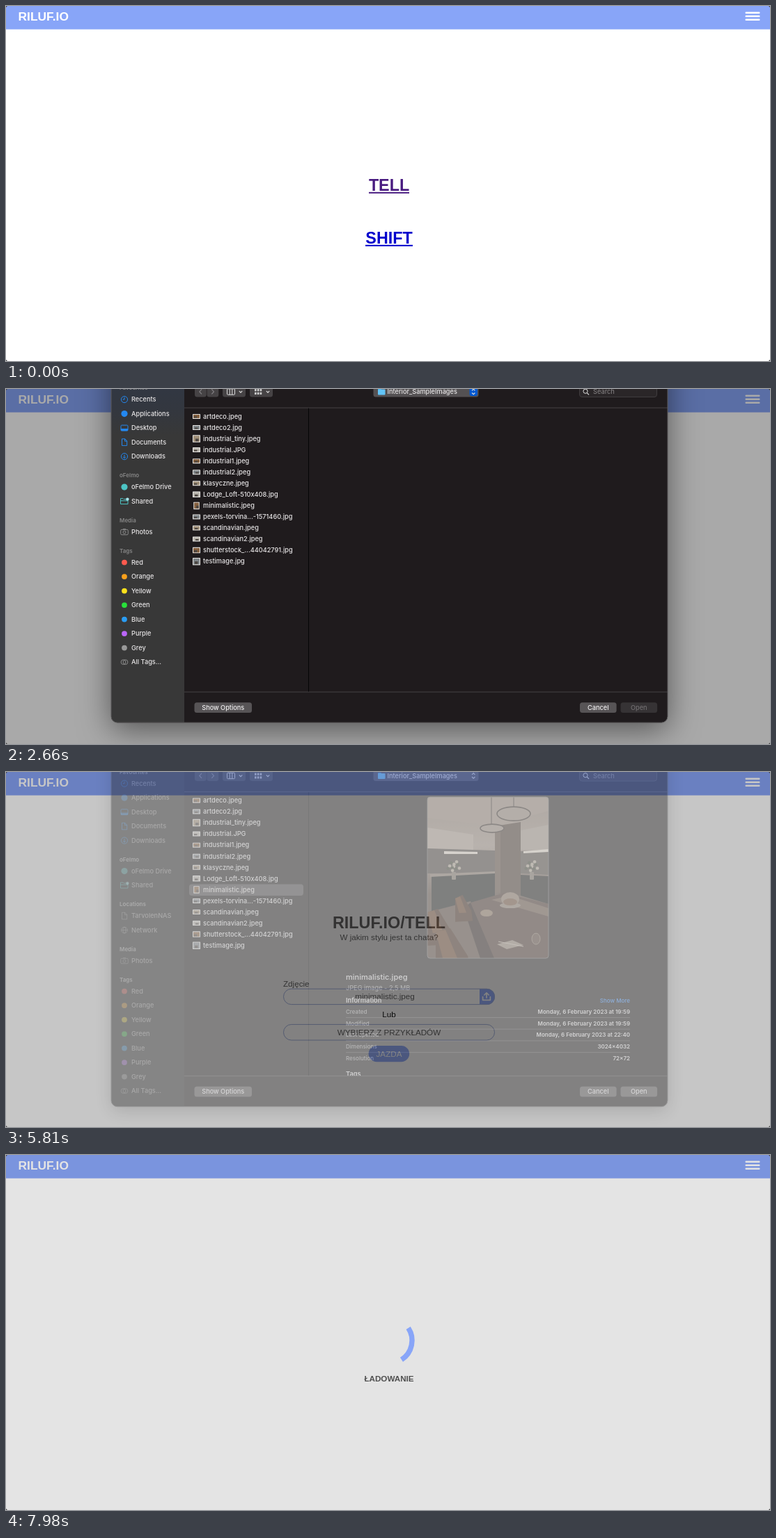
Recreate the animation shown at these times as an HTML page with a canvas. Size 1097 by 511 pixels, loop 8000 ms.

```html
<!DOCTYPE html>
<html lang="pl">
<head>
<meta charset="utf-8">
<title>Room style demo</title>
<style>
html, body { margin: 0; width: 100%; height: 100%; overflow: hidden; background: #fff; }
canvas { display: block; }
</style>
</head>
<body>
<canvas id="stage" width="1097" height="511"></canvas>
<script>
const W = 1097, H = 511, LOOP = 8000, STEP = 70;
const page = document.getElementById('stage').getContext('2d');
const sheetCanvas = document.createElement('canvas');
sheetCanvas.width = W;
sheetCanvas.height = H;
const sheet = sheetCanvas.getContext('2d');

const SANS = '"Liberation Sans", Arial, sans-serif';
const UI = 'Inter, Roboto, sans-serif';
const BRAND = 'RILUF.IO';
const BLUE = '#88a5f8', ACCENT = '#0058d0', ICON = '#2488f0', TEAL = '#4cc4c4', GREY = '#8b8b8b';

const FILES = ['artdeco.jpeg', 'artdeco2.jpg', 'industrial_tiny.jpeg', 'industrial.JPG',
  'industrial1.jpeg', 'industrial2.jpeg', 'klasyczne.jpeg', 'Lodge_Loft-510x408.jpg',
  'minimalistic.jpeg', 'pexels-torvina...-1571460.jpg', 'scandinavian.jpeg',
  'scandinavian2.jpeg', 'shutterstock_...44042791.jpg', 'testimage.jpg'];
const SELECTED = 8;

const SIDEBAR = [
  ['Favourites', [['Recents', 'clock', ICON], ['Applications', 'dot', ICON], ['Desktop', 'desktop', ICON],
    ['Documents', 'doc', ICON], ['Downloads', 'down', ICON]]],
  ['oFelmo', [['oFelmo Drive', 'dot', TEAL], ['Shared', 'folder', TEAL]]],
  ['Locations', [['TarvolenNAS', 'doc', GREY], ['Network', 'globe', GREY]]],
  ['Media', [['Photos', 'camera', GREY]]],
  ['Tags', [['Red', 'tag', '#ff5a4e'], ['Orange', 'tag', '#f9a01c'], ['Yellow', 'tag', '#ffe21c'],
    ['Green', 'tag', '#28e03a'], ['Blue', 'tag', '#2a9df4'], ['Purple', 'tag', '#bb66fa'],
    ['Grey', 'tag', '#999'], ['All Tags...', 'rings', GREY]]]
];

const INFO = [['Created', 'Monday, 6 February 2023 at 19:59'], ['Modified', 'Monday, 6 February 2023 at 19:59'],
  ['Last opened', 'Monday, 6 February 2023 at 22:40'], ['Dimensions', '3024×4032'], ['Resolution', '72×72']];

function text(c, str, x, y, size, color, { weight = 400, align = 'left', family = SANS } = {}) {
  c.font = `${weight} ${size}px ${family}`;
  c.textAlign = align;
  c.fillStyle = color;
  c.fillText(str, x, y);
}

// Interface text, placed by its vertical centre.
function label(str, x, cy, size = 9.2, color = '#e8e6e7', weight = 500, align = 'left') {
  text(sheet, str, x, cy + size * 0.36, size, color, { weight, align, family: UI });
}

function box(c, x, y, w, h, r, fill, stroke) {
  c.beginPath();
  c.roundRect(x, y, w, h, r);
  if (fill) { c.fillStyle = fill; c.fill(); }
  if (stroke) { c.strokeStyle = stroke; c.stroke(); }
}

function line(c, color, width, ...pts) {
  c.beginPath();
  for (let i = 0; i < pts.length; i += 2) c.lineTo(pts[i], pts[i + 1]);
  c.strokeStyle = color;
  c.lineWidth = width;
  c.stroke();
}

function poly(c, fill, ...pts) {
  c.beginPath();
  for (let i = 0; i < pts.length; i += 2) c.lineTo(pts[i], pts[i + 1]);
  c.fillStyle = fill;
  c.fill();
}

function oval(c, x, y, rx, ry, fill, stroke) {
  c.beginPath();
  c.ellipse(x, y, rx, ry, 0, 0, 7);
  if (fill) { c.fillStyle = fill; c.fill(); }
  if (stroke) { c.strokeStyle = stroke; c.stroke(); }
}

function drawNav() {
  page.fillStyle = BLUE;
  page.fillRect(0, 0, W, 33.6);
  text(page, BRAND, 17.5, 20.8, 17.4, '#fff', { weight: 700 });
  for (const y of [8.4, 13.4, 18.4]) box(page, 1061.5, y, 21, 2.5, 1, '#fff');
}

function drawCorners() {
  for (const x of [0, W]) for (const y of [0, H]) {
    const dx = x ? -2 : 2, dy = y ? -2 : 2;
    poly(page, '#444', x, y, x + dx, y, x, y + dy);
  }
}

function drawHome() {
  const links = [['TELL', 266, '#481a80', 521, 58], ['SHIFT', 342, '#0200cc', 516, 68]];
  for (const [name, y, color, x, w] of links) {
    text(page, name, 550, y, 23.3, color, { weight: 700, align: 'center' });
    page.fillRect(x, y + 1.8, w, 2);
  }
}

function drawForm(fileName, ready) {
  const center = (str, x, y, color, size = 11.67, weight = 400) =>
    text(page, str, x, y, size, color, { weight, align: 'center' });
  const ink = '#555', border = '#9dacdb';
  center(BRAND + '/TELL', 550, 225.3, ink, 23.34, 700);
  center('W jakim stylu jest ta chata?', 550, 241.6, ink);
  text(page, 'Zdjęcie', 398, 309.3, 11.67, ink);

  page.lineWidth = 1;
  box(page, 680, 312, 22, 23, [0, 11.5, 11.5, 0], BLUE);
  box(page, 398.5, 312.2, 303, 22.4, 11.2, null, border);
  page.lineCap = page.lineJoin = 'round';
  line(page, '#fff', 1.7, 690, 325, 690, 318.5);
  line(page, '#fff', 1.7, 686.8, 321, 690, 317.8, 693.2, 321);
  line(page, '#fff', 1.7, 684.6, 323.5, 684.6, 328.3, 695.4, 328.3, 695.4, 323.5);
  page.lineCap = 'butt';
  page.lineJoin = 'miter';
  center(fileName, 544, 327.4, ink);

  center('Lub', 550, 353.4, '#000');
  page.lineWidth = 1;
  box(page, 398.5, 363.4, 303, 22.6, 11.3, null, border);
  center('WYBIERZ Z PRZYKŁADÓW', 550, 379, ink);
  box(page, 520.6, 394, 58.6, 23.2, 11.6, ready ? BLUE : '#c1d1fc');
  center('JAZDA', 550, 409.8, '#fff');
}

function drawLoader(t) {
  const mid = (12 + (t - 7980) * 0.3) * Math.PI / 180;
  page.beginPath();
  page.arc(550, 267, 33, mid - Math.PI / 4, mid + Math.PI / 4);
  page.strokeStyle = BLUE;
  page.lineWidth = 7.4;
  page.stroke();
  text(page, 'ŁADOWANIE', 550, 325.6, 11.67, '#505050', { weight: 700, align: 'center' });
}

function drawIcon(kind, y, color) {
  const c = sheet, x = 170;
  c.lineWidth = 1;
  c.strokeStyle = color;
  const stroke = (...pts) => line(c, color, 1, ...pts);
  switch (kind) {
    case 'dot': oval(c, x, y, 4.6, 4.6, color); break;
    case 'tag': oval(c, x, y, 3.9, 3.9, color); break;
    case 'clock':
      oval(c, x, y, 4.6, 4.6, null, color);
      stroke(x, y - 3, x, y, x - 2.3, y);
      break;
    case 'down':
      oval(c, x, y, 4.6, 4.6, null, color);
      stroke(x, y - 2.5, x, y + 2.5);
      stroke(x - 2, y + 0.6, x, y + 2.6, x + 2, y + 0.6);
      break;
    case 'globe':
      oval(c, x, y, 4.4, 4.4, null, color);
      oval(c, x, y, 2, 4.4, null, color);
      stroke(x - 4.4, y, x + 4.4, y);
      break;
    case 'desktop':
      box(c, x - 5, y - 4, 10, 8, 1.3, null, color);
      c.fillStyle = color;
      c.fillRect(x - 5, y + 1, 10, 3);
      break;
    case 'doc':
      stroke(x - 3.5, y - 4.8, x + 0.8, y - 4.8, x + 3.7, y - 1.8, x + 3.7, y + 4.8, x - 3.5, y + 4.8, x - 3.5, y - 4.8);
      stroke(x + 0.6, y - 4.8, x + 0.6, y - 1.5, x + 3.7, y - 1.5);
      break;
    case 'folder':
      stroke(x - 5.5, y + 4, x - 5.5, y - 4, x - 2, y - 4, x - 1, y - 3, x + 5, y - 3, x + 5, y + 4, x - 5.5, y + 4);
      stroke(x - 5.5, y - 0.8, x + 5, y - 0.8);
      oval(c, x + 4.4, y - 3, 2.2, 2.2, '#a9e4ea');
      break;
    case 'camera':
      box(c, x - 5.3, y - 3.2, 10.6, 7.4, 1.4, null, color);
      oval(c, x, y + 0.5, 2, 2, null, color);
      stroke(x - 2, y - 4, x + 2, y - 4);
      break;
    case 'rings':
      oval(c, x - 1.5, y, 3.4, 3.4, null, color);
      oval(c, x + 1.5, y, 3.4, 3.4, null, color);
  }
}

function drawSidebar(focused, withLocations) {
  const tint = sheet.createLinearGradient(0, 0, 0, 75);
  tint.addColorStop(0, '#313743');
  tint.addColorStop(0.5, '#33373f');
  tint.addColorStop(1, '#383838');
  sheet.fillStyle = focused ? tint : '#262626';
  sheet.fillRect(151, -60, 105, 549);
  let y = 7;
  for (const [title, items] of SIDEBAR) {
    if (title === 'Locations' && !withLocations) continue;
    label(title, 163, y, 8, '#868686', 600);
    y += 16.5;
    for (const [name, icon, color] of items) {
      sheet.globalAlpha = focused ? 1 : 0.45;
      drawIcon(icon, y, color);
      label(name, 180, y);
      sheet.globalAlpha = 1;
      y += 20.5;
    }
    y += 7;
  }
}

function drawThumb(i, y) {
  const tall = i === SELECTED, square = i === 2 || i === 13;
  const w = tall ? 8.5 : 11, h = tall || square ? 10.5 : i === 7 || i === 12 ? 8.5 : 7;
  const x = 273.5 - w / 2, top = y - h / 2;
  const tone = ['#a08f78', '#7e8488', '#85603f', '#b8b4ac'][(i * 7 + 2) % 4];
  box(sheet, x, top, w, h, 0.5, '#e6e4e2');
  sheet.fillStyle = tone;
  sheet.fillRect(x + 1, top + 1, w - 2, h - 2);
  sheet.fillStyle = '#4a4440';
  sheet.fillRect(x + 2 + i % 3, top + h / 2, w / 2 - 1, h / 2 - 1.5);
}

function drawFiles(selected, focused) {
  if (selected) box(sheet, 263, 168.3, 164, 16.6, 4, focused ? ACCENT : '#4c494a');
  FILES.forEach((name, i) => {
    const y = 47.8 + i * 16.06;
    drawThumb(i, y);
    label(name, 283, y);
  });
}

function chevron(x, y, dir = 1) {
  line(sheet, '#ddd', 1.2, x - 2.2, y - dir, x, y + dir * 1.2, x + 2.2, y - dir);
}

function drawToolbar(focused) {
  const c = sheet, y = 12.3, face = focused ? '#464345' : '#383638';
  for (const [x, side] of [[271, -1], [288.5, 1]]) {
    box(c, x, 4.7, 16.8, 15.2, 3.5, face);
    const m = x + 8.4;
    line(c, '#858285', 1.1, m - side * 1.6, y - 3.5, m + side * 1.6, y, m - side * 1.6, y + 3.5);
  }
  for (const x of [311, 350]) {
    box(c, x, 4.7, 33, 15.2, 3.5, face);
    chevron(x + 26, y);
  }
  c.lineWidth = 1;
  box(c, 317.5, 8.2, 11, 8.4, 1, null, '#ddd');
  for (const x of [321.2, 324.8]) line(c, '#ddd', 1, x, 8.2, x, 16.6);
  for (let i = 0; i < 6; i++) box(c, 357 + i % 3 * 3.8, 8.4 + (i > 2) * 4.8, 2.6, 3.2, 0.5, '#ccc');

  box(c, 527.5, 4.7, 151, 15.2, 3.5, focused ? '#545153' : '#454345');
  box(c, 534, 8, 5, 4, 1, '#37a5e8');
  box(c, 534, 9, 10.5, 7.8, 1, '#62c4f7');
  label('Interior_SampleImages', 547.5, y);
  if (focused) box(c, 665.5, 6, 11.5, 12.4, 3, ACCENT);
  chevron(671.2, y - 2.6, -1);
  chevron(671.2, y + 2.6);

  c.lineWidth = 1;
  box(c, 823.5, 4.9, 111, 15, 3.5, '#2a2628', '#403d3f');
  oval(c, 832, 11.6, 3.1, 3.1, null, '#ddd');
  line(c, '#ddd', 1.2, 834.3, 14, 837, 16.8);
  label('Search', 843, y, 9.2, '#7d7a7c');
}

function drawPhoto() {
  const c = sheet;
  c.save();
  c.translate(605, 43);
  c.beginPath();
  c.roundRect(0, 0, 174, 232, 4);
  c.clip();
  const wall = c.createLinearGradient(0, 0, 0, 140);
  wall.addColorStop(0, '#8d7d6f');
  wall.addColorStop(0.5, '#a5968a');
  wall.addColorStop(1, '#5a4a40');
  c.fillStyle = wall;
  c.fillRect(0, 0, 174, 232);
  poly(c, '#9c8c7e', 0, 0, 174, 0, 174, 20, 96, 42, 0, 30);
  poly(c, '#b3a598', 0, 44, 66, 54, 66, 78, 0, 74);
  poly(c, '#4b443f', 0, 74, 97, 77, 97, 110, 0, 110);
  poly(c, '#f0e6d8', 24, 78, 72, 79, 72, 82, 24, 82);
  poly(c, '#a99c90', 134, 48, 174, 40, 174, 76, 134, 76);
  poly(c, '#524a44', 134, 78, 174, 76, 174, 112, 134, 110);
  poly(c, '#eee4d6', 138, 78, 174, 75, 174, 79, 138, 81);
  poly(c, '#493930', 97, 42, 134, 36, 134, 142, 97, 138);
  poly(c, '#5c4a3e', 97, 42, 105, 41, 105, 138, 97, 138);
  poly(c, '#181a18', 6, 112, 97, 108, 97, 146, 6, 166);
  poly(c, '#887a6d', 4, 111, 97, 107, 97, 110, 4, 115);
  poly(c, '#1b1b19', 134, 112, 174, 114, 174, 154, 134, 142);
  poly(c, '#54443a', 0, 166, 62, 150, 90, 232, 0, 232);
  poly(c, '#45322a', 62, 152, 110, 138, 174, 154, 174, 232, 82, 232);
  poly(c, '#251a16', 52, 160, 62, 152, 96, 232, 76, 232);
  poly(c, '#6a5447', 92, 148, 118, 142, 174, 160, 174, 172);
  for (const [x, y, s] of [[0, 166, 1], [12, 194, 1.4], [40, 146, 0.7]]) {
    poly(c, '#3d2416', x, y, x + 15 * s, y - 5, x + 33 * s, y + 25 * s, x + 36 * s, y + 46 * s, x, y + 48 * s);
    poly(c, '#5f3a20', x, y, x + 10 * s, y - 3, x + 23 * s, y + 29 * s, x + 8 * s, y + 30 * s);
  }
  line(c, '#332b26', 1, 92, 0, 92, 40);
  line(c, '#332b26', 1, 124, 0, 124, 16);
  c.lineWidth = 1.6;
  oval(c, 93, 45, 17, 6, '#9f9184', '#382e28');
  oval(c, 124, 24, 24, 10, '#9b8c7f', '#382e28');
  for (const [x, y] of [[38, 100], [150, 100]]) {
    for (let i = 0; i < 11; i++) {
      const a = i * 2.4, r = 3 * Math.sqrt(i);
      oval(c, x + r * Math.cos(a), y + r * Math.sin(a) * 0.8, 2.3, 2.2, i % 2 ? '#3d4230' : '#b5ab98');
    }
    box(c, x - 3, y + 8, 6, 11, 1, '#7e7468');
  }
  oval(c, 119, 156, 15, 4, '#8f7f70');
  oval(c, 119, 147, 13, 10, '#8d7b6a');
  oval(c, 119, 151, 10, 5, '#70503a');
  oval(c, 85, 167, 9, 5, '#8b745f');
  c.lineWidth = 1;
  oval(c, 156, 204, 6, 8, '#59473b', '#8d7b6d');
  poly(c, '#98897a', 100, 212, 122, 206, 138, 213, 114, 219);
  line(c, '#c5b8a9', 1, 102, 208, 138, 215);
  c.restore();
  c.lineWidth = 0.8;
  box(c, 605, 43, 174, 232, 4, null, '#777');
}

function drawPreview() {
  drawPhoto();
  label('minimalistic.jpeg', 488, 302.4, 11);
  label('JPEG image - 2,5 MB', 488, 317.6, 9.2, '#a3a1a2', 400);
  label('Information', 488, 335.3, 9.2, '#e8e6e7', 600);
  label('Show More', 896, 335.6, 8, '#3d8cf5', 500, 'right');
  INFO.forEach(([key, value], i) => {
    const y = 351.8 + i * 16.75;
    label(key, 488, y, 8, '#a3a1a2');
    label(value, 896, y, 8, '#e8e6e7', 600, 'right');
    if (i < 4) line(sheet, '#4b4849', 1, 488, y + 8.5, 896, y + 8.5);
  });
  sheet.save();
  sheet.beginPath();
  sheet.rect(435, 430, 515, 14);
  sheet.clip();
  label('Tags', 488, 441.6, 9.2, '#e8e6e7', 600);
  sheet.restore();
}

function drawButton(name, x, w, fill = '#575456', color = '#f0eeef') {
  box(sheet, x, 459.6, w, 14.9, 3.5, fill);
  label(name, x + w / 2, 467, 9.2, color, 500, 'center');
}

function drawSheet(t, dy) {
  const focused = t < 5670, selected = t >= 4270, preview = t >= 4340;
  const c = sheet;
  c.clearRect(0, 0, W, H);
  c.save();
  c.translate(0, dy);
  c.save();
  c.shadowColor = `rgba(0,0,0,${focused ? 0.5 : 0.35})`;
  c.shadowBlur = focused ? 45 : 24;
  c.shadowOffsetY = focused ? 10 : 6;
  box(c, 151, -60, 799, 548.6, 9, focused ? '#1f1b1d' : '#1d1c1c');
  c.restore();

  c.save();
  c.beginPath();
  c.roundRect(151, -60, 799, 548.6, 9);
  c.clip();
  drawSidebar(focused, t >= 2730);
  c.restore();
  drawToolbar(focused);
  line(c, '#454243', 1, 256, 35.5, 950, 35.5);
  line(c, '#454243', 1, 256, 444.5, 950, 444.5);
  line(c, '#050505', 1, 434.5, 36, 434.5, 444);
  drawFiles(selected, focused);
  if (preview) drawPreview();

  drawButton('Show Options', 270.5, 82.5);
  drawButton('Cancel', 824, 52.6);
  if (!preview) drawButton('Open', 882.5, 52.6, '#363335', '#716e70');
  else drawButton('Open', 882.5, 52.6, !focused ? '#575456' : t >= 5530 ? '#2f7be6' : ACCENT);
  c.lineWidth = 1;
  box(c, 151, -60, 799, 548.6, 9, null, '#5d5b5c');
  c.restore();
}

function drawDialog(t) {
  const opening = t < 5600;
  const shown = opening ? Math.min(1, (t - 2450) / 350) : 1 - (t - 5600) / 350;
  page.fillStyle = `rgba(0,0,0,${0.56 * shown})`;
  page.fillRect(0, 0, W, H);
  drawSheet(t, (opening ? -21 : -11.5) * (1 - shown));
  page.globalAlpha = opening ? Math.min(1, shown / 0.6) : shown;
  page.drawImage(sheetCanvas, 0, 0);
  page.globalAlpha = 1;
}

function render(t) {
  page.fillStyle = '#fff';
  page.fillRect(0, 0, W, H);
  drawNav();
  if (t < 1400) drawHome();
  else if (t < 7070) drawForm(t < 5740 ? 'Wybierz plik' : 'minimalistic.jpeg', t >= 5670);
  if (t >= 2520 && t < 5950) drawDialog(t);
  if (t >= 7070) {
    const fade = Math.min(1, (t - 7000) / 350);
    page.fillStyle = `rgba(0,0,0,${0.105 * fade})`;
    page.fillRect(0, 0, W, H);
    page.globalAlpha = fade;
    drawLoader(t);
    page.globalAlpha = 1;
  }
  drawCorners();
}

const start = performance.now();
function tick() {
  const t = (performance.now() - start) % LOOP;
  render(Math.floor(t / STEP) * STEP);
  requestAnimationFrame(tick);
}
tick();
</script>
</body>
</html>
```
